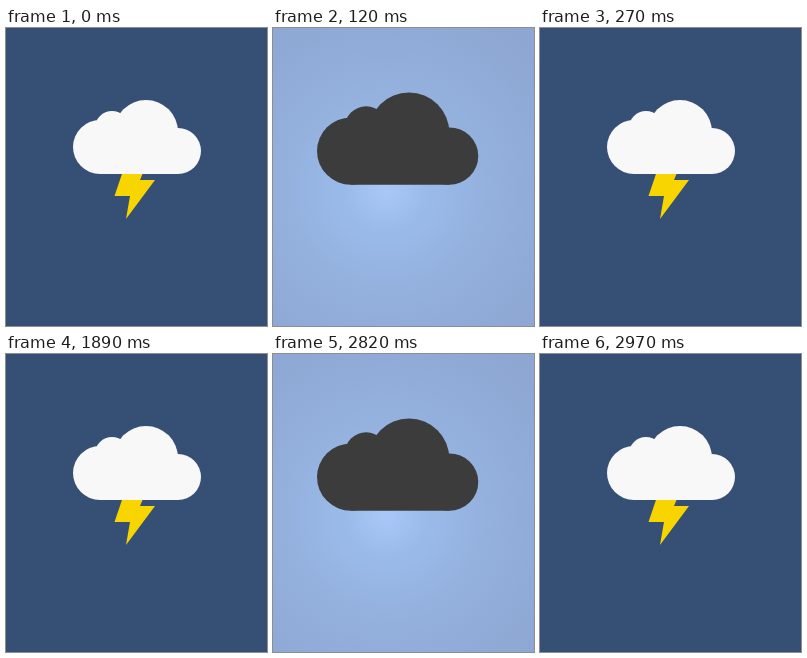
Write an HTML page that moves like this. It is 261 by 298 pixels and loops after 5.37 s.

```html
<!DOCTYPE html>
<html>
<head>
<meta charset="utf-8">
<style>
  html, body { margin: 0; width: 100%; height: 100%; overflow: hidden; background: #365075; }
  svg { display: block; width: 100vw; height: 100vh; }
</style>
</head>
<body>
<svg viewBox="0 0 261 298">
  <defs>
    <radialGradient id="glow" gradientUnits="userSpaceOnUse" cx="113" cy="162" r="205">
      <stop offset="0" stop-color="#a9c8f9"/>
      <stop offset=".2" stop-color="#9abbea"/>
      <stop offset=".5" stop-color="#94b0dd"/>
      <stop offset="1" stop-color="#8da6d2"/>
    </radialGradient>
    <g id="cloud">
      <circle cx="94" cy="119" r="27"/>
      <circle cx="106" cy="100" r="17"/>
      <circle cx="140" cy="104" r="32"/>
      <circle cx="172" cy="123" r="23"/>
      <path d="M94 100H172V146H94Z"/>
    </g>
  </defs>
  <rect width="261" height="298" fill="#365075"/>
  <g id="calm">
    <path d="M118 140H139L134 152H149L120 191L124 168H108.5Z" fill="#f9d500"/>
    <use href="#cloud" fill="#f8f8f8"/>
  </g>
  <g id="flash" visibility="hidden">
    <rect width="261" height="298" fill="url(#glow)"/>
    <use href="#cloud" fill="#3c3c3c" transform="translate(44 156.7) scale(1.26 1.245) translate(-67 -146)"/>
  </g>
</svg>
<script>
  const LOOP = 5370, STRIKES = [60, 2760];
  const PULSES = [[0, 30], [60, 30], [150, 60]]; // delay, length
  const SOFT_EDGE = [1890, 840];
  const calm = document.getElementById('calm');
  const flash = document.getElementById('flash');
  const within = (t, [start, length]) => t >= start && t < start + length;

  function draw(now) {
    const t = now % LOOP;
    const lit = STRIKES.some(s => PULSES.some(p => within(t - s, p)));
    flash.setAttribute('visibility', lit ? 'visible' : 'hidden');
    calm.style.filter = within(t, SOFT_EDGE) ? 'blur(0.4px)' : 'none';
  }

  const start = performance.now();
  function tick() {
    draw(performance.now() - start);
    requestAnimationFrame(tick);
  }
  tick();
</script>
</body>
</html>
```
